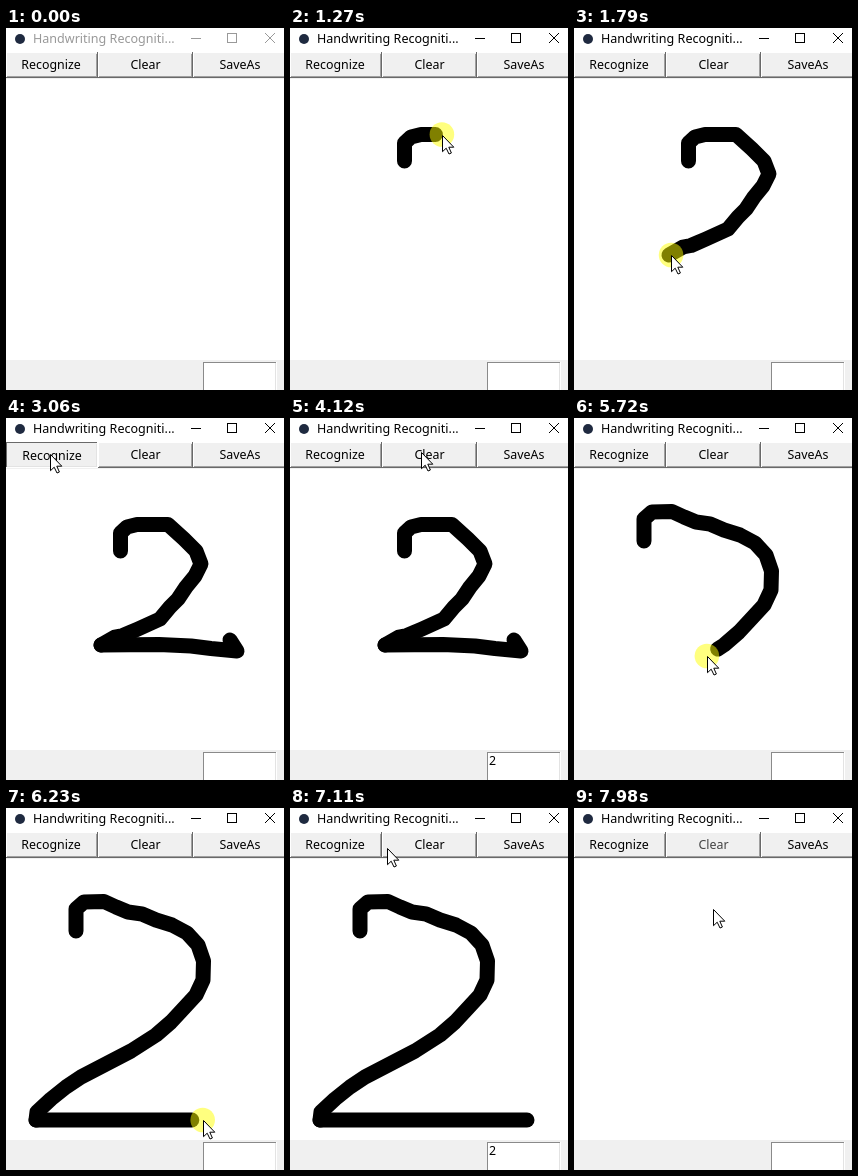
Write an HTML page that moves like this. It is 278 px wide and 362 px high and loops after 8000 ms.

```html
<!DOCTYPE html>
<html>
<head>
<meta charset="utf-8">
<style>
html, body { margin: 0; width: 100%; height: 100%; overflow: hidden; background: #fff; }
svg { display: block; width: 278px; height: 362px; }
text { font-family: "Noto Sans", "Open Sans", sans-serif; font-size: 12.4px; }
</style>
</head>
<body>
<svg viewBox="0 0 278 362">
  <rect width="278" height="362" fill="#fff"/>
  <circle cx="14" cy="11" r="5" fill="#1f2a40"/>
  <g id="bar">
    <text x="27" y="15" style="font-size:12.55px">Handwriting Recogniti...</text>
    <g fill="none" stroke="currentColor">
      <path d="M185 10.5H195M221.5 5.5H230.5V14.5H221.5Z" shape-rendering="crispEdges"/>
      <path d="M259 5L269 15M269 5L259 15"/>
    </g>
  </g>
  <rect y="24" width="278" height="27" fill="#f0f0f0"/>
  <g id="buttons"></g>
  <rect y="332" width="278" height="30" fill="#f0f0f0"/>
  <g shape-rendering="crispEdges">
    <rect x="197" y="334" width="74" height="28" fill="#fff"/>
    <path d="M197.5 362V334.5H270" fill="none" stroke="#8a8a8a"/>
    <path d="M269.5 335V362" stroke="#e3e3e3"/>
  </g>
  <text id="result" x="199" y="347">2</text>
  <g id="ink" fill="none" stroke="#000" stroke-width="15" stroke-linecap="round" stroke-linejoin="round"></g>
  <circle id="glow" r="12.3" fill="#ff0" opacity=".5"/>
  <path id="cursor" d="M.5 .5V16.7L4.2 13.2L7 19L9.4 18L6.8 12.2H11.8Z" fill="#fff" stroke="#000"/>
</svg>
<script>
const LOOP = 8000, LAG = 20;
const $ = id => document.getElementById(id);

function add(parent, tag, attrs, text) {
  const el = document.createElementNS("http://www.w3.org/2000/svg", tag);
  for (const k in attrs) el.setAttribute(k, attrs[k]);
  if (text) el.textContent = text;
  parent.appendChild(el);
  return el;
}
const show = (el, on) => el.setAttribute("visibility", on ? "visible" : "hidden");
const within = (t, spans) => spans.some(([a, b]) => t >= a && t < b);

// Pointer legs: start, end, path, and for pen strokes the time they are cleared
const legs = [
  [70, 190, "M248 340L145 189"],
  [520, 830, "M145 189Q126 150 96 135"],
  [1030, 1090, "M96 135L114.5 133"],
  [1090, 1270, "M114.5 133V115L121 109L131 106.5H151.5", 4420],
  [1270, 1765, "M151.5 106.5H162L178 121L190 133L195 146L189 158L180 169L172 181L164 189L154 201L132 211L117 217.5L109 219L95 227", 4420],
  [1785, 2220, "M95 227L153 226.5L185 228L205 230.5L231 233L224 222", 4420],
  [2250, 2630, "M224 222Q130 100 46 39"],
  [2700, 2820, "M46 39L44 36"],
  [3380, 3510, "M44 36L49 36"],
  [3680, 4000, "M49 36Q90 42 131 34"],
  [4510, 4700, "M131 34Q118 90 98 117"],
  [4700, 4780, "M98 117L95 112"],
  [5110, 5270, "M95 112L70 123"],
  [5270, 5925, "M70 123V101L78 94L98 93.5L110 99L122 104L136 106L150 112L166 117L181 125L192 137L197.5 153L197 172L190 187L178 200L165 214L150 227L125 243L100 256L75 269L60 279L45 291L31 304L30 312", 7920],
  [5925, 6305, "M30 312H237", 7920],
  [6340, 6720, "M237 312Q140 130 44 37"],
  [6980, 7260, "M44 37Q100 44 161 34"],
  [7430, 7650, "M161 34L147 32"],
  [7920, 7980, "M147 32L139 101"]
].map(([start, end, d, wipe]) => {
  const path = add($("ink"), "path", wipe ? { d } : { d, stroke: "none" });
  return { start, end, wipe, path, len: path.getTotalLength() };
});

function travelled(leg, t) {
  const p = Math.max(0, Math.min(1, (t - leg.start) / (leg.end - leg.start)));
  return leg.len * (leg.wipe ? p : p * p * (3 - 2 * p));
}

const buttons = [
  ["Recognize", 0, 92, 45, [[3060, 3290], [6820, 6940]]],
  ["Clear", 92, 95, 139.5, [[4260, 4420], [7820, 7920]]],
  ["SaveAs", 187, 94, 234, []]
].map(([name, x, w, mid, presses]) => {
  const g = add($("buttons"), "g", {});
  const edge = d => add(g, "path", { d, fill: "none", "shape-rendering": "crispEdges" });
  const r = x + w;
  const inner = edge(`M${r - 1.5} 26V48.5H${x + 1}`);
  const high = edge(`M${x + .5} 49V24.5H${r}`);
  const low = edge(`M${r - .5} 24V49.5H${x}`);
  const label = add(g, "text", { x: mid, y: 41, "text-anchor": "middle" }, name);
  return { inner, high, low, label, presses };
});

function draw(t) {
  $("bar").setAttribute("style", t < 1090 ? "color:#999;fill:#999" : "color:#000;fill:#000");

  for (const b of buttons) {
    const down = within(t, b.presses);
    b.high.setAttribute("stroke", down ? "#696969" : "#fff");
    b.low.setAttribute("stroke", down ? "#fff" : "#696969");
    b.inner.setAttribute("stroke", down ? "#e3e3e3" : "#a0a0a0");
    b.label.setAttribute("transform", down ? "translate(1 1)" : "");
  }
  buttons[1].label.setAttribute("fill", t >= 7920 ? "#444" : "#000");
  show($("result"), within(t, [[3290, 4420], [6940, 7920]]));

  let now = null;
  for (const leg of legs) {
    if (t >= leg.start) now = leg;
    if (!leg.wipe) continue;
    show(leg.path, t >= leg.start + LAG && t < leg.wipe);
    leg.path.setAttribute("stroke-dasharray", `${travelled(leg, t - LAG)} 2000`);
  }
  show($("cursor"), now);
  show($("glow"), now && now.wipe);
  if (now) {
    const { x, y } = now.path.getPointAtLength(travelled(now, t));
    $("cursor").setAttribute("transform", `translate(${Math.round(x)} ${Math.round(y)})`);
    $("glow").setAttribute("transform", `translate(${x} ${y})`);
  }
}

const begin = performance.now();
function tick() {
  draw((performance.now() - begin) % LOOP);
  requestAnimationFrame(tick);
}
tick();
</script>
</body>
</html>
```
